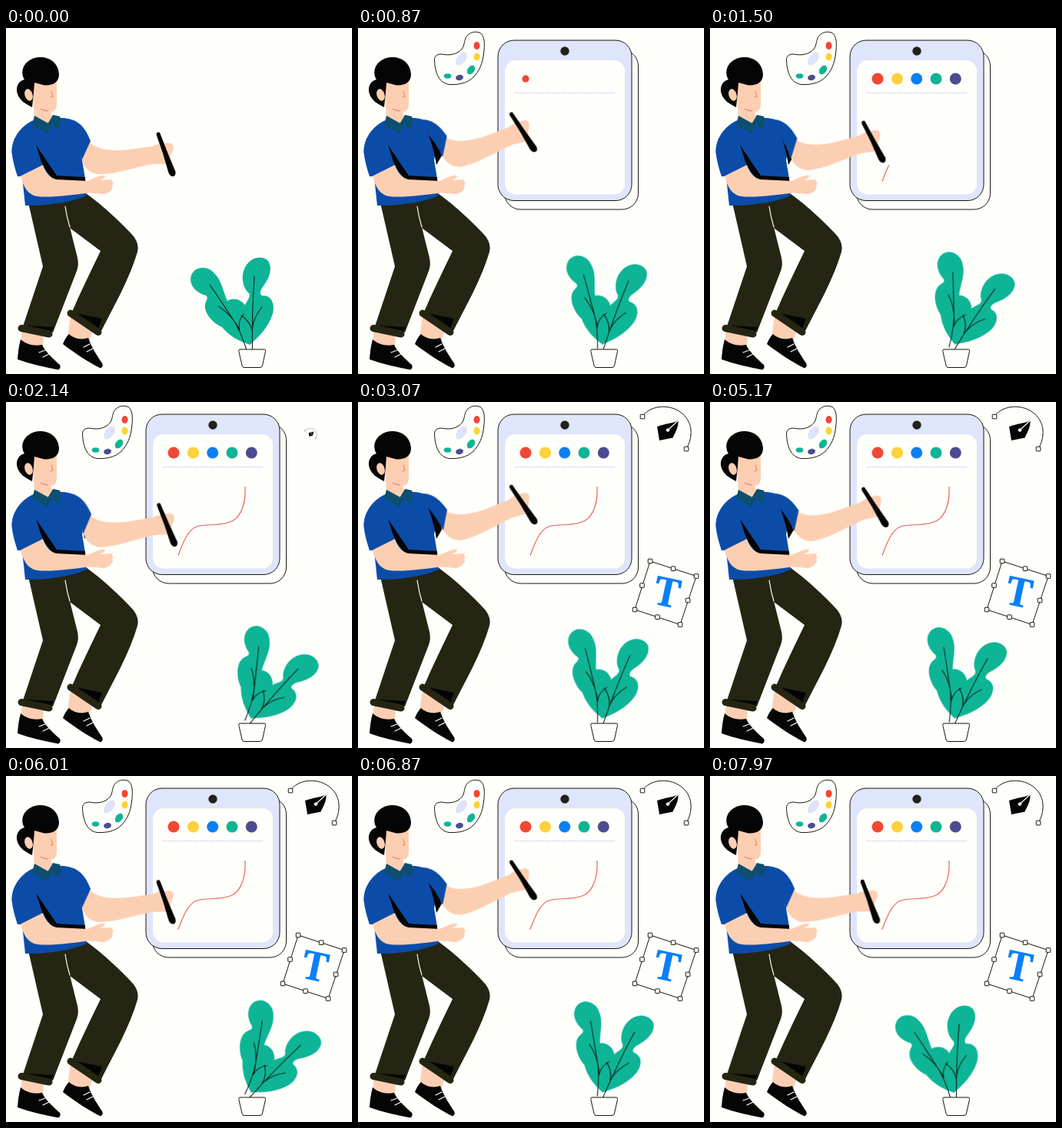
These frames come from a looping animation (450 px wide and 450 px high, 8000 ms). An HTML page:

```html
<!DOCTYPE html>
<html lang="en">
<head>
<meta charset="utf-8">
<title>Designer at work</title>
<style>
html, body { margin: 0; width: 100%; height: 100%; overflow: hidden; background: #fefefb; }
svg { display: block; width: 100vw; height: 100vh; }

.paper { fill: #fefefb; }
.skin { fill: #fdcfb2; }
.shirt { fill: #0c4ca9; }
.collar { fill: #0c4f6e; }
.cloth { fill: #252513; }
.ink { fill: #050505; }
.leaf { fill: #0eb496; }
.line { stroke: #17170f; stroke-width: 1; stroke-linejoin: round; }
.thin { fill: none; stroke: #10251c; stroke-width: 1.1; stroke-linecap: round; }
.cuff { stroke: #252513; stroke-width: 9; stroke-linecap: round; }
.lace { fill: none; stroke: #fefefb; stroke-width: 1.2; stroke-linecap: round; }

.red { fill: #f24532; }
.yellow { fill: #fdd138; }
.blue { fill: #0b80f4; }
.green { fill: #12b493; }
.purple { fill: #4d4b91; }

/* Every part shares one 8 s clock. */
.move { animation: 8s linear infinite; }
.arm { transform-origin: 85px 119px; animation-name: arm; animation-duration: 2s; }
.plant { transform-origin: 318.6px 413.5px; animation-name: sway; animation-duration: 4s; }
.tablet { transform-origin: 273px 126px; animation-name: tablet; }
.palette { transform-origin: 133px 40px; animation-name: palette; }
.nib { transform-origin: 395px 43px; animation-name: nib; }
.type { transform-origin: 400px 248px; animation-name: type; }
.curve { fill: none; stroke: #ea6656; stroke-width: 1.2; stroke-dasharray: 1 2; animation-name: draw; }
.dot { transform-box: fill-box; transform-origin: center; }
.d1 { animation-name: d1; }
.d2 { animation-name: d2; }
.d3 { animation-name: d3; }
.d4 { animation-name: d4; }
.d5 { animation-name: d5; }
.tablet, .palette, .nib, .type { animation-timing-function: cubic-bezier(.3, 1.35, .6, 1); }
.dot { animation-timing-function: ease-out; }

@keyframes arm { 50% { transform: rotate(-15deg); } }
@keyframes sway { 50% { transform: rotate(43deg); } }
@keyframes tablet { 0%, .4% { transform: scale(0); } 5.5%, 100% { transform: none; } }
@keyframes palette { 0%, 5% { transform: scale(0); } 10%, 100% { transform: none; } }
@keyframes d1 { 0%, 9.8% { transform: scale(0); } 12.3%, 100% { transform: none; } }
@keyframes d2 { 0%, 11.05% { transform: scale(0); } 13.55%, 100% { transform: none; } }
@keyframes d3 { 0%, 12.3% { transform: scale(0); } 14.8%, 100% { transform: none; } }
@keyframes d4 { 0%, 13.55% { transform: scale(0); } 16.05%, 100% { transform: none; } }
@keyframes d5 { 0%, 14.8% { transform: scale(0); } 17.3%, 100% { transform: none; } }
@keyframes draw { 0%, 17.5% { stroke-dashoffset: 1.01; } 25%, 100% { stroke-dashoffset: 0; } }
@keyframes nib { 0%, 26.5% { transform: scale(0); } 31%, 100% { transform: none; } }
@keyframes type { 0%, 32% { transform: scale(0); } 37%, 100% { transform: none; } }
</style>
</head>
<body>
<svg viewBox="0 0 450 450">
  <defs>
    <rect id="grip" class="paper line" x="-2.8" y="-2.8" width="5.6" height="5.6" rx=".6"/>
  </defs>

  <g class="move palette">
    <path class="paper line" d="M99.500 42C99 35 105 33 112 34.500C122 36 133 33 137 24C139 18 139 12 143 9C147 5 154 4 159 6.500C165 10 165 22 163.500 33C162 46 158 56 150 64C142 72 130 74 119 73.500C105 72 100 57 99.500 42Z"/>
    <ellipse cx="134.500" cy="40" rx="5.500" ry="10" fill="#dfe3fb" transform="rotate(38 134.500 40)"/>
    <ellipse class="red" cx="154.500" cy="23" rx="4" ry="5"/>
    <ellipse class="yellow" cx="154.500" cy="37.500" rx="4" ry="5"/>
    <ellipse class="green" cx="147" cy="54.500" rx="4.500" ry="6.500" transform="rotate(35 147 54.500)"/>
    <ellipse class="purple" cx="132" cy="64.500" rx="5" ry="3.700" transform="rotate(-12 132 64.500)"/>
    <ellipse class="green" cx="116.500" cy="62.500" rx="4.800" ry="3.200"/>
  </g>

  <g class="move tablet">
    <rect class="paper line" x="190.500" y="28.500" width="174" height="207.500" rx="21"/>
    <rect class="line" x="182" y="16" width="174" height="208.500" rx="21" fill="#dfe5fa"/>
    <rect class="paper" x="191" y="42" width="156" height="174.500" rx="14"/>
    <circle cx="269" cy="30" r="5.700" fill="#22211a"/>
    <path d="M204 84.500H334" stroke="#c6c8e6" stroke-dasharray="2 1"/>
  </g>
  <circle class="move dot d1 red" cx="218" cy="66" r="7.500"/>
  <circle class="move dot d2 yellow" cx="243.500" cy="66" r="7.500"/>
  <circle class="move dot d3 blue" cx="268.700" cy="66" r="7.500"/>
  <circle class="move dot d4 green" cx="294" cy="66" r="7.500"/>
  <circle class="move dot d5 purple" cx="319.300" cy="66" r="7.500"/>
  <path class="move curve" pathLength="1" d="M224 199.500C229 186 236 166 248 162C262 158 281 162 295 154.500C307 147 312 130 311 110"/>

  <g class="move nib">
    <path class="line" fill="none" d="M370 19C378 6 400 2 416 11C434 21 438 42 427 61"/>
    <use href="#grip" transform="translate(370 19)"/>
    <use href="#grip" transform="translate(427 61)"/>
    <path class="ink" d="M416.500 24C409 28 399 28 389 32L392 50L409.500 46.500C412 40 417 34 416.500 24Z"/>
    <path class="lace" d="M403.500 36L416 24.500"/>
    <circle class="paper" cx="403" cy="36.500" r="2.200"/>
  </g>

  <g class="move type">
    <path class="line" fill="none" d="M380 207L440 226.500L419 289.500L360 270Z"/>
    <use href="#grip" x="380" y="207"/><use href="#grip" x="440" y="226.500"/>
    <use href="#grip" x="419" y="289.500"/><use href="#grip" x="360" y="270"/>
    <use href="#grip" x="410" y="216.700"/><use href="#grip" x="429" y="258"/>
    <use href="#grip" x="389.500" y="279.700"/><use href="#grip" x="369.500" y="238.500"/>
    <text class="blue" transform="translate(402 247.500) rotate(12)" y="18.500" text-anchor="middle" font-family="'Noto Serif', serif" font-weight="700" font-size="52">T</text>
  </g>

  <g class="move plant">
    <path class="paper" d="M308 404L313 421H321L321 404Z"/>
    <path class="leaf" d="M318 412C303 408 290 400 281 389C268 383 257 370 259 359C260 354 264 351 260 348C246 344 238 334 240.500 323C244 310 261 308 270 318C281 328 282 343 288 355C296 350 306 353 311 361C318 376 320 395 318 412Z"/>
    <path class="leaf" d="M317 412C308 396 304 376 311 360C315 352 318 350 316 345C308 338 306 325 309 316C314 299 332 294 341 303C348 314 341 328 333 338C330 343 330 347 333 348C345 347 350 358 347 371C342 388 330 401 317 412Z"/>
    <path class="thin" d="M265 334C275 348 285 364 294 377C302 389 308 403 313 419M276 362C285 367 298 380 304 393M309 372C304 378 302 384 303.500 391M323 323C321 350 320 385 320.500 420M333 363C327 370 322 379 320.500 390M306 374Q318 382 320 394"/>
  </g>
  <path class="paper line" d="M304 418H336Q338 418 337.500 420.500L333.500 439Q333 441.500 330 441.500H310Q307.500 441.500 307 439L302.800 420.500Q302.500 418 304 418Z"/>

  <g>
    <path class="skin" d="M21 393L49 398L48 416L19 411Z"/>
    <path class="skin" d="M84 374L113 394L108 408L80 402Z"/>
    <path class="ink" d="M19 405C27 412 37 414 47 412C51 421 62 431 70 438Q72 442 68 444.500C50 441 32 437 15 431Q16 416 19 405Z"/>
    <path class="ink" d="M82 398C88 404 98 406 107 403C111 415 119 427 125 436Q127 440 123 442.500C106 434 88 422 74 411Q77 403 82 398Z"/>
    <path class="lace" d="M43 422L51 419M48 428L56 424M101 415L109 411M105 421L113 417"/>
    <path class="cloth" d="M74 224L104 215C126 231 149 252 166 271Q173.500 281 171 291C161 326 141 360 124 394L86 369C97 343 110 317 123 290L83 260Z"/>
    <path class="ink" d="M91 371L89 374L119 394L125 378Z"/>
    <path class="cloth" d="M29 227L78 224L83 259L93 299Q95 308 92 316L61 396L22 388L48 310Z"/>
    <path class="ink" d="M26 387L62 389L58 397L24 391Z"/>
    <path class="lace" d="M77 232Q79 246 83 259"/>
    <path class="cuff" d="M84 371L120 395.500M20 390.500L56 398"/>
  </g>

  <g>
    <path class="shirt" d="M38 119C20 126 7 143 7.500 162C9 174 12 184 15 193L21 193L25 231C53 231 81 228 105 218L103 196L99 172L104 145C100 127 87 117 72 117Z"/>
    <path class="ink" d="M91 137L108 152L109 166L102 178Q99 158 91 137Z"/>
    <path class="ink" d="M39 152L53 173L66 192L103 194V199L62 198L48 180Z"/>
    <path class="skin" d="M19 192.500L48 178Q54 195 66 197L106 199C115 196 121 191 129 192Q128 196 122 198L139 197Q136 199 140 202Q137 204 139 207Q136 214 128 216L108 214.500C85 217 60 221 41 219C28 217 23 207 19 192.500Z"/>
    <path class="skin" d="M34 70L66 67L66 100Q65 109 58 109L60 116L53 126L37 118Z"/>
    <path class="ink" d="M24 67C17 56 24 39 44 38C58 38 68 46 69 60C69 70 62 75 50 74.500L37 71L36 84L34 103C24 98 18 94 15 86C12 77 16 69 24 67Z"/>
    <ellipse class="skin" cx="29.500" cy="87" rx="5" ry="8" transform="rotate(-18 29.500 87)"/>
    <path d="M59 82L61 89L57.500 90" fill="none" stroke="#f08a6a" stroke-width="1.200"/>
    <path d="M45 105Q49 108 55 107.500" fill="none" stroke="#f0857a" stroke-width="1.200"/>
    <path class="collar" d="M37 114L55 124L61 113L70 115L72 121L68 133L60 125L54 137L34 126Z"/>
  </g>

  <g class="move arm">
    <path class="skin" d="M106 146C115 157 135 161 160 158L190 154C196 151 205 149 214 150Q219.500 152 217 159L214 166L212 177L190 177C165 182 140 191 118 190C105 187 100 178 97 166Z"/>
    <path class="shirt" d="M73 117.500C92 117 103 128 110 147L98.500 172Q94 152 86 138L74 128Z"/>
    <path class="ink" d="M195.500 138.500Q196 134.500 200 136L210.500 163L220.500 187Q221 193 216.500 193Q212.500 192.500 211 187L204 163Z"/>
  </g>
</svg>
</body>
</html>
```
